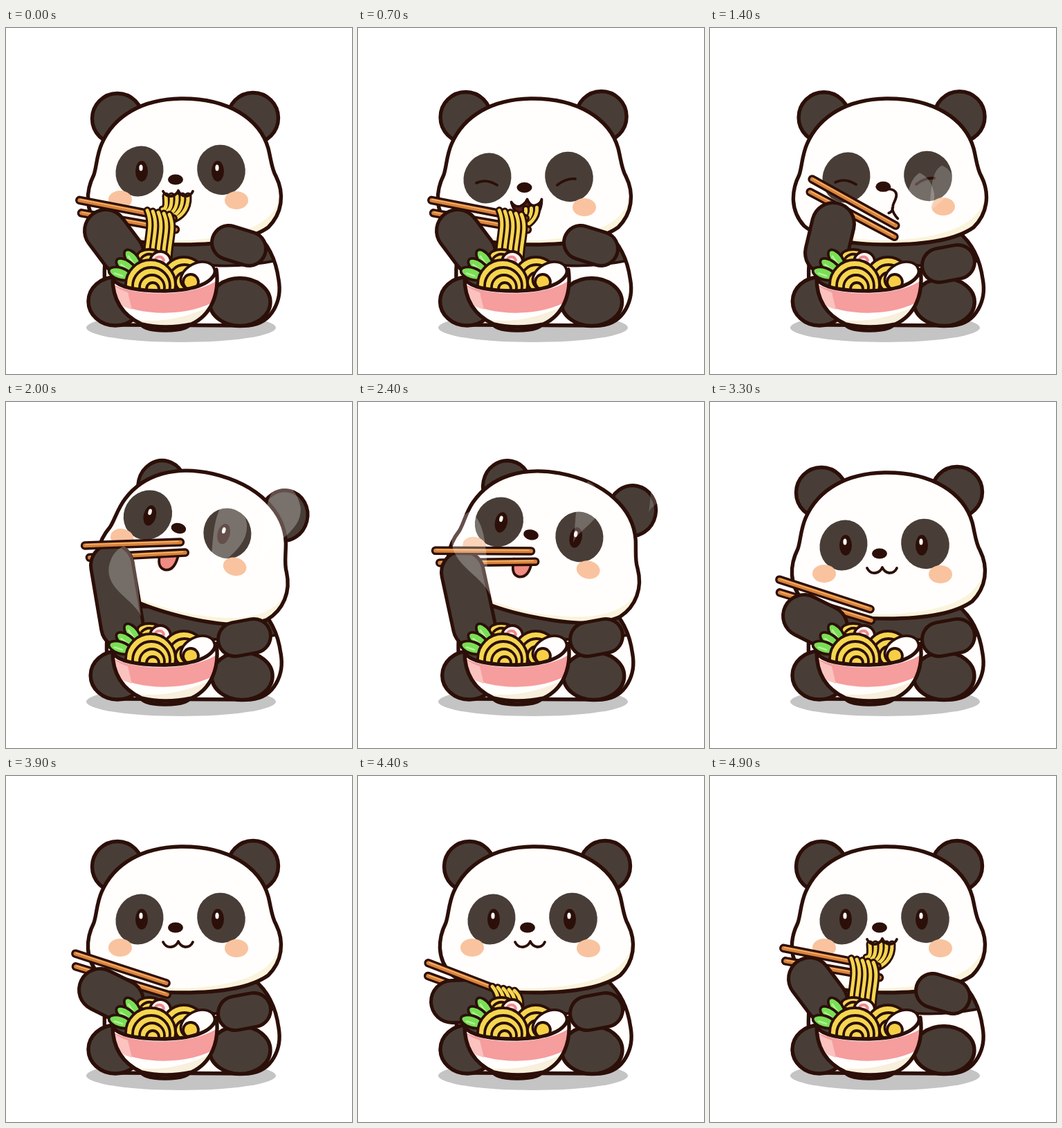
Recreate the animation shown at these times as an HTML page. Size 500 by 500 pixels, loop 5 s.

```html
<!DOCTYPE html>
<html lang="en">
<head>
<meta charset="utf-8">
<title>Panda eating noodles</title>
<style>
html, body { margin: 0; width: 100%; height: 100%; overflow: hidden; background: #fff; }
svg { display: block; width: 100vw; height: 100vh; }
.ink { stroke: #2c0f08; stroke-width: 5.4; stroke-linejoin: round; stroke-linecap: round; }
.thin { stroke-width: 3.8; }
.line { fill: none; }
.fur { fill: #483e37; }
.white { fill: #fffefc; }
.dark { fill: #2c0f08; }
.blush { fill: #f9c39f; }
.noodle { fill: #f4d650; }
</style>
</head>
<body>
<svg viewBox="0 0 500 500">
  <defs>
    <path id="bodyShape" d="M152 296C137 335 138 404 165 429L350 430C386 427 399 392 394 364C390 334 378 310 358 294Z"/>
    <path id="headShape" d="M252 102C322 101 367 132 379 174C383 190 384 204 390 214C403 240 399 268 379 288C351 308 300 313 256 313C205 313 158 306 134 286C114 264 115 236 127 212C131 200 131 184 138 168C156 126 198 103 252 102Z"/>
    <path id="dishShape" d="M154 361C160 376 195 380 230 380C270 379 299 371 304 349C309 385 296 415 268 428Q230 436 196 428C166 414 154 390 154 361Z"/>
    <clipPath id="bodyClip"><use href="#bodyShape"/></clipPath>
    <clipPath id="headClip"><use href="#headShape"/></clipPath>
    <clipPath id="dishClip"><use href="#dishShape"/></clipPath>
  </defs>
  <ellipse cx="253" cy="433" rx="137" ry="21" fill="#c4c4c4"/>

  <g id="body">
    <use href="#bodyShape" class="white"/>
    <path class="fur ink thin" clip-path="url(#bodyClip)" d="M110 280H410V332Q350 346 300 343Q215 336 110 346Z"/>
    <use href="#bodyShape" class="line ink"/>
    <ellipse class="fur ink" cx="158" cy="395" rx="39" ry="35"/>
    <ellipse class="fur ink" cx="338" cy="396" rx="44" ry="34.5"/>
  </g>

  <g id="head">
    <g id="ears">
      <circle class="fur ink" cx="161" cy="131" r="36.5"/>
      <circle class="fur ink" cx="357" cy="130" r="36.5"/>
    </g>
    <use href="#headShape" class="white"/>
    <path clip-path="url(#headClip)" fill="#fbf4dc" d="M396 240C390 287 330 305 250 307Q190 306 150 290L150 330H410Z"/>
    <use href="#headShape" class="line ink"/>
  </g>
  <g id="face">
    <ellipse class="fur" cx="193" cy="207" rx="34" ry="37" transform="rotate(25 193 207)"/>
    <ellipse class="fur" cx="311" cy="205" rx="34.5" ry="36.5" transform="rotate(-25 311 205)"/>
    <ellipse class="blush" id="cheek" cx="165" cy="248" rx="17" ry="13"/>
    <ellipse class="blush" cx="333" cy="249" rx="17" ry="13"/>
    <g id="open">
      <ellipse class="dark" cx="196" cy="207" rx="9" ry="15"/>
      <ellipse class="dark" cx="306" cy="207" rx="9" ry="15"/>
      <ellipse fill="#fff" cx="195" cy="202" rx="2.6" ry="4.5"/>
      <ellipse fill="#fff" cx="305" cy="202" rx="2.6" ry="4.5"/>
    </g>
    <path id="shut" class="line ink thin" d="M177 214Q191 207 207 217M294 217Q306 207 320 208"/>
    <g id="muzzle">
      <ellipse class="dark" cx="245" cy="219" rx="11" ry="7.5"/>
      <path id="jaw" fill="#5a1d16" class="ink thin" d="M226 240Q231 248 239 246Q246 243 249 236Q253 246 260 245Q268 243 270 236Q270 260 250 267Q231 260 226 240Z"/>
      <path id="tongue" fill="#f08c84" class="ink thin" d="M228 258Q227 282 240 282Q254 281 254 258Z"/>
      <g id="bite"></g>
      <path id="smile" class="line ink thin" d="M227 240Q231 248 239 247Q246 246 249 239Q252 246 259 247Q267 247 270 240"/>
      <path id="side" class="line ink thin" d="M250 222C258 222 264 225 264 231C264 239 258 243 259 249Q258 256 253 257M258 250Q259 258 266 265"/>
    </g>
  </g>

  <g id="armR"></g>
  <g id="stickB"></g>
  <g id="armL"></g>
  <g id="stickA"></g>
  <g id="hang"></g>
  <g id="steam" fill="#fff"></g>

  <ellipse class="noodle ink thin" cx="207" cy="329" rx="17" ry="9"/>
  <path class="line ink thin" d="M196 332Q206 322 218 331"/>
  <circle class="ink thin" fill="#fff5f0" cx="223" cy="338" r="15"/>
  <path fill="none" stroke="#f08a90" stroke-width="4" stroke-linecap="round" d="M215 338Q216 329 224 331Q231 335 225 340"/>
  <g id="moundB"></g>
  <ellipse class="white ink thin" cx="277" cy="358" rx="26" ry="18" transform="rotate(-28 277 358)"/>
  <circle fill="#f7cf45" class="ink thin" cx="267" cy="367" r="11"/>
  <g id="greens"></g>
  <g id="moundA"></g>
  <path class="ink" fill="#fffaf2" d="M194 425Q196 437 230 437Q265 437 267 425Z"/>
  <use href="#dishShape" class="white"/>
  <g clip-path="url(#dishClip)">
    <path fill="#f69d9d" d="M150 368C185 389 275 391 312 360V388C275 418 190 420 150 391Z"/>
    <path fill="#fbc3bf" d="M150 368Q163 378 176 382L182 407Q165 402 150 391Z"/>
    <path fill="#f8efdc" d="M180 421Q240 430 300 400V440H180Z"/>
  </g>
  <use href="#dishShape" class="line ink"/>
</svg>
<script>
const $ = id => document.getElementById(id);
const INK = '#2c0f08', FUR = '#483e37', YELLOW = '#f4d650';
const LOOP = 5000, STEP = 100;
const clamp = v => Math.max(0, Math.min(1, v));
const smooth = (t, from, to) => { const u = clamp((t - from) / (to - from)); return u * u * (3 - 2 * u); };
const row = (n, f) => Array.from({ length: n }, (_, i) => f(i));

// Each pose holds from..to and eases into the next; x: head, turn: head tilt,
// fx, fy: where the face points, hand + grip: chopstick hand and angle, paw: 1 = lowered.
const eat = { x: 0, turn: 0, fx: 0, fy: 0, handX: 144, handY: 293, grip: 11, paw: 0 };
const munch = { ...eat, x: -3, fx: -3, fy: 10 };
const chew = { ...eat, x: 2, fx: 2, fy: 9, handX: 178, handY: 283, grip: 29, paw: 1 };
const lookUp = { x: 21, turn: 14, fx: -11, fy: -28, handX: 153, handY: 236, grip: -2, paw: 1 };
const rest = { ...chew, x: 6, turn: 1.5, handX: 143, handY: 287, grip: 9.6 };
const idle = { ...eat, handX: 136, handY: 309, grip: 18, paw: 1 };
const dip = { ...idle, handY: 326, grip: 21 };
const story = [
  [0, 200, eat], [600, 1000, munch], [1300, 1500, chew], [1850, 2300, lookUp],
  [2650, 2750, rest], [3050, 4200, idle], [4400, 4450, dip], [4700, LOOP, eat]
];

function poseAt(t) {
  const i = story.findLastIndex(s => s[0] <= t);
  const [, leave, a] = story[i];
  const [arrive, , b] = story[i + 1] || story[i];
  if (t <= leave) return a;
  const e = smooth(t, leave, arrive), mix = {};
  for (const k in a) mix[k] = a[k] + (b[k] - a[k]) * e;
  return mix;
}

const stroke = (d, color, width) =>
  `<path d="${d}" fill="none" stroke="${color}" stroke-width="${width}" stroke-linecap="round"/>`;
const limb = (d, width) => stroke(d, INK, width + 5) + stroke(d, FUR, width - 5);
const strands = paths =>
  paths.map(d => stroke(d, INK, 11)).join('') + paths.map(d => stroke(d, YELLOW, 5)).join('');
const mound = (x, y, r) => row(4, i =>
  `<circle class="noodle ink thin" cx="${x + i}" cy="${y + i * 2}" r="${r - i * 9}"/>`).join('');
const leaf = i => `<g transform="translate(${183 - i * 9} ${335 + i * 10})rotate(${-36 - i * 18})">
  <ellipse class="ink thin" fill="#79df55" rx="8.5" ry="17"/>${stroke('M-2 -8V4', '#b5f294', 2.5)}</g>`;

$('moundA').innerHTML = mound(209, 371, 36);
$('moundB').innerHTML = mound(257, 363, 32);
$('greens').innerHTML = row(3, leaf).join('');
for (const id of ['stickA', 'stickB'])
  $(id).innerHTML = stroke('M-69 0H69', INK, 12.5) + stroke('M-69 0H69', '#d9813a', 5.8) + stroke('M-68 -1.3H66', '#f3b367', 1.6);

const wisps = [
  { born: 700, life: 2300, x: 275, y: 330, drift: 70, lean: -1 },
  { born: 1100, life: 1500, x: 300, y: 265, drift: 150, lean: -1.1 },
  { born: 1400, life: 1900, x: 188, y: 320, drift: -35, lean: 1 }
];
$('steam').innerHTML = wisps.map(() =>
  '<path d="M22 60C10 30 -38 15 -34 -25C-30 -45 -22 -55 -8 -62C20 -45 14 10 22 60Z"/>').join('');

const move = (id, v) => $(id).setAttribute('transform', v);
const show = (id, on) => $(id).setAttribute('visibility', on ? 'visible' : 'hidden');

function drawFace(t, { x, turn, fx, fy }) {
  const spin = `rotate(${turn} 258 207)`;
  move('body', `translate(${x * 0.15} 0)`);
  move('head', `translate(${x} 0)${spin}`);
  // Ears swing against the face and draw closer as the head turns.
  move('ears', `translate(${x * 0.8 + 258} ${fy * -0.2})scale(${1 - turn * 0.005} 1)translate(-258 0)`);
  move('face', `translate(${x + fx} ${fy})${spin}`);
  move('muzzle', `translate(${fy * 0.15} ${fy * 0.15})`);
  $('cheek').setAttribute('opacity', clamp(1 - fy / 10));

  const bites = t < 1100 || t >= 4700;
  const jaw = t >= 500 && t < 1100;
  const side = t >= 1100 && t < 1700;
  const tongue = t >= 1700 && t < 2500;
  show('open', !jaw && !side);
  show('shut', jaw || side);
  show('jaw', jaw);
  show('side', side);
  show('tongue', tongue);
  show('smile', !jaw && !side && !tongue);
  move('smile', `translate(0 ${bites ? -4 : 0})`);
  const first = jaw ? 2 : 0;
  $('bite').innerHTML = strands(row(bites ? 5 - first : 0, n => {
    const i = n + first, sx = 231 + i * 8;
    return `M${sx} ${jaw ? 252 - i : 243}C${sx + 1} ${255 + i * 2} ${232 + i * 5} ${262 + i * 3} ${226 + i * 3} ${262 + i * 4}`;
  }));
}

function drawArms(t, { handX, handY, grip, paw }) {
  $('armL').innerHTML = limb(`M${handX} ${handY}L168 325`, 61);
  $('armR').innerHTML = limb(`M${322 + paw * 9} ${310 + paw * 33}L${351 + paw * 7} ${319 + paw * 19}`, 49);

  const cx = handX + 30, cy = handY - 31;
  move('stickA', `translate(${cx} ${cy})rotate(${grip})`);
  move('stickB', `translate(${cx} ${cy})rotate(${grip - 1})translate(6 16.5)`);

  const a = grip * Math.PI / 180;
  const px = cx + 45 * Math.cos(a), py = cy + 45 * Math.sin(a);
  const end = t < 1100 ? 338 - 53 * smooth(t, 750, 1050) : 338;
  $('hang').innerHTML = strands(row(t < 1100 || t >= 4400 ? 5 : 0, i => {
    const x = px - 14 + i * 8, y = py - 7 + i * 1.5, h = end - y, foot = 203 + i * 8;
    return `M${x} ${y}C${x + 9} ${y + h * 0.3} ${foot} ${y + h * 0.55} ${foot} ${end}`;
  }));
}

function drawSteam(t) {
  wisps.forEach(({ born, life, x, y, drift, lean }, i) => {
    const u = clamp((t - born) / life), swell = Math.sin(Math.PI * u);
    const el = $('steam').children[i];
    el.setAttribute('transform', `translate(${x + drift * u} ${y - (t - born) * 0.1})scale(${lean * swell} ${swell})`);
    el.setAttribute('opacity', 0.27 * Math.sqrt(swell));
  });
}

function tick() {
  const t = Math.floor(performance.now() % LOOP / STEP) * STEP;
  const pose = poseAt(t);
  drawFace(t, pose);
  drawArms(t, pose);
  drawSteam(t);
  requestAnimationFrame(tick);
}
tick();
</script>
</body>
</html>
```
